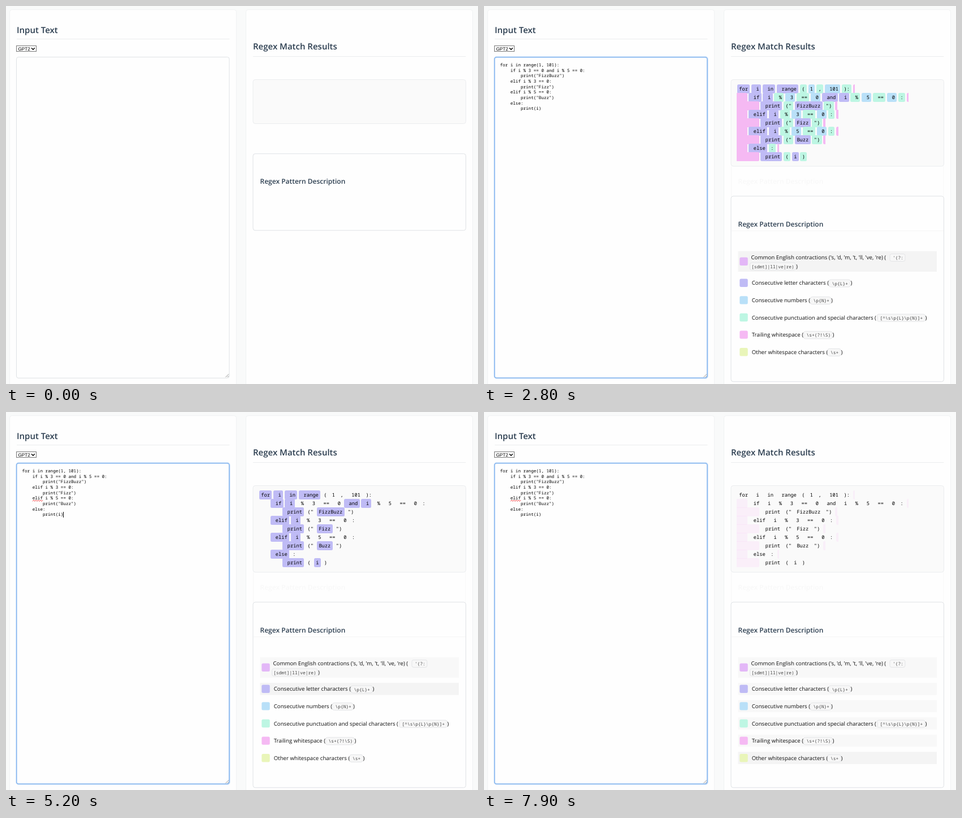
An HTML page that plays this animation: 835 px wide and 670 px high, repeating every 8 s.

```html
<!DOCTYPE html>
<html lang="en">
<head>
<meta charset="utf-8">
<title>Regex match results</title>
<style>
html, body { margin: 0; width: 100%; height: 100%; overflow: hidden; background: #f9fafa; }
body { position: relative; text-rendering: geometricPrecision; }
svg { position: absolute; left: 0; top: 0; }
text { white-space: pre; font: 9.7px "Open Sans", "Noto Sans", sans-serif; fill: #111; }
.h1, .h2 { font-weight: 600; fill: #2c3e50; }
.h1 { font-size: 15px; }
.h2 { font-size: 12px; }
.code, #tokens { font-family: "Noto Sans Mono", "DejaVu Sans Mono", monospace; }
.code { font-size: 7.6px; fill: #000; }
.chipText { font-size: 7.9px; fill: #444; }
.chip { fill: #f7f7f7; stroke: #e4e5e7; }
.card { fill: #fefefe; stroke: #f0f2f3; }
.rule { stroke: #ebedee; }
.box { fill: #fefefe; stroke: #dfe2e5; }
.result { fill: #fafafa; stroke: #ebedef; }
.ghost { fill: #f8f8f8; }
#tokens { position: absolute; left: 446.5px; top: 140px; margin: 0; white-space: pre;
  font-size: 8.75px; line-height: 15px; color: #000; }
#tokens span { padding: 1.55px 3.3px; margin: 0 1.4px; border-radius: 2.5px; }
</style>
</head>
<body>
<svg width="835" height="670" fill="none">
  <rect class="card" x="6.5" y="6.5" width="401" height="690" rx="4"/>
  <rect class="card" x="424.5" y="6.5" width="401" height="690" rx="4"/>
  <text class="h1" x="19" y="48">Input Text</text>
  <path class="rule" d="M19 58.5H395.500M437 89.500H813.500"/>
  <rect x="18.500" y="70.500" width="35" height="10" stroke="#777" fill="#fff"/>
  <text x="21.500" y="78.700" style="font:8.2px 'Liberation Sans',Arial,sans-serif;fill:#000">GPT2</text>
  <path d="M45 74.200L47.900 77.200L50.800 74.200" stroke="#000" stroke-width="1.500"/>
  <rect class="box" x="18.500" y="90.500" width="376.500" height="569" rx="3.500"/>
  <g id="focus">
    <rect x="18" y="90" width="378" height="570" rx="4" stroke="#dfecfb" stroke-width="2"/>
    <rect x="18.700" y="90.700" width="376.200" height="568.600" rx="3.500" stroke="#7fb2ee" stroke-width="1.500"/>
  </g>
  <path d="M388.500 658L394 652.500M391.800 658L394 655.800" stroke="#777" stroke-width=".8"/>
  <text class="h1" x="437" y="77">Regex Match Results</text>

  <g id="before">
    <rect class="result" x="437" y="130.500" width="376.500" height="78" rx="4"/>
    <rect class="box" x="437" y="261.800" width="376.500" height="136" rx="4"/>
    <text class="h2" x="449.500" y="315">Regex Pattern Description</text>
  </g>

  <g id="after">
    <path d="M437.500 284V337M813 284V337" stroke="#f7f7f7"/>
    <text class="h2 ghost" x="449.500" y="315">Regex Pattern Description</text>
    <rect class="result" x="437" y="130.500" width="376.500" height="153.500" rx="4"/>
    <rect class="box" x="437" y="337" width="376.500" height="328.800" rx="4"/>
    <path d="M438 398.500H813" stroke="#f6f6f6"/>
    <text class="h2" x="449.500" y="391">Regex Pattern Description</text>
    <g id="legend"></g>
    <g id="typed"></g>
    <path id="squiggle" stroke="#f03030" stroke-width=".9"/>
  </g>
  <path id="caret" stroke="#000"/>
</svg>
<pre id="tokens"></pre>

<script>
const $ = id => document.getElementById(id);
const esc = s => s.replace(/&/g, '&amp;').replace(/</g, '&lt;');
const show = (id, on) => { $(id).style.visibility = on ? 'visible' : 'hidden'; };
// last entry whose start time has passed
const at = (keys, t) => keys.filter(k => k[0] <= t).pop();

const program = `for i in range(1, 101):
    if i % 3 == 0 and i % 5 == 0:
        print("FizzBuzz")
    elif i % 3 == 0:
        print("Fizz")
    elif i % 5 == 0:
        print("Buzz")
    else:
        print(i)`;

const text = (x, y, s, cls = '') => `<text class="${cls}" x="${x}" y="${y}">${esc(s)}</text>`;
const chip = (x, y, w, s, tx) =>
  `<rect class="chip" x="${x}" y="${y - 9.5}" width="${w}" height="13" rx="3"/>` +
  text(tx, y, s, 'code chipText');

$('typed').innerHTML = program.split('\n')
  .map((line, i) => text(28.5, 107 + i * 9.68, line, 'code')).join('');
$('squiggle').setAttribute('d', 'M47 158.3' + 'l2 -2.200l2 2.200'.repeat(4) + 'l2 -2.200');

// Legend: label, pattern, swatch, chip x, chip width, hover start
const rows = [
  ["Common English contractions ('s, 'd, 'm, 't, 'll, 've, 're) (", '', '#e3b7f7', 0, 0, 2400],
  ['Consecutive letter characters (', '\\p{L}+', '#bfbbf5', 610.5, 37.5, 4500],
  ['Consecutive numbers (', '\\p{N}+', '#b9e0f8', 577.5, 36, 5400],
  ['Consecutive punctuation and special characters (', '[^\\s\\p{L}\\p{N}]+', '#bdf6e3', 695.5, 84.5, 6100],
  ['Trailing whitespace (', '\\s+(?!\\S)', '#f5b9f3', 565.5, 50.5, 6700],
  ['Other whitespace characters (', '\\s+', '#e9f5b9', 608, 23, 7800]
];
$('legend').innerHTML = rows.map(([label, code, color, cx, cw], i) => {
  const y = i ? 460.2 + i * 30.6 : 452.8;
  const h = i ? 21.5 : 36.5;
  const words = i
    ? text(473.7, y + 3.5, label) + chip(cx, y + 3.7, cw, code, cx + 5) + text(cx + cw + .6, y + 3.5, ')')
    : text(472.5, 448.5, label) + chip(718, 449, 27, "'(?:", 723) +
      chip(470.5, 464.5, 80.5, '[sdmt]|ll|ve|re)', 473) + text(552, 464.5, ')');
  return `<rect class="row" x="449.500" y="${y - h / 2}" width="351.500" height="${h}"/>` +
    `<rect x="452.300" y="${y - 7.2}" width="14.400" height="14.400" rx="2.500" fill="${color}"/>` + words;
}).join('');
const rowBoxes = [...document.querySelectorAll('.row')];

// Split the program into tokens, kinds in legend order from letters to whitespace
const splitter = / ?\p{L}+| ?\p{N}+| ?[^\s\p{L}\p{N}]+|\s+(?!\S)|\s+/gu;
const kindOf = s => /\p{L}/u.test(s) ? 0 : /\p{N}/u.test(s) ? 1 : /\S/.test(s) ? 2 : 3;
const tokens = program.match(splitter).map(s => {
  const el = document.createElement('span');
  el.textContent = s;
  $('tokens').append(el);
  return { el, kind: kindOf(s) };
});

// Highlight strength: time, letters, numbers, punctuation, whitespace
const levels = [
  [0, 1, 1, 1, 1], [3800, .5, .5, .5, .5], [3900, 0, 0, 0, 0],
  [4300, .5, .5, .5, .5], [4400, .9, .9, .9, .9], [4500, 1, 0, 0, 0],
  [5400, .5, .5, 0, 0], [5500, 0, 1, 0, 0],
  [6100, 0, .5, .5, 0], [6200, 0, 0, 1, 0],
  [6700, 0, 0, .8, .3], [6800, 0, 0, .6, .7], [6900, 0, 0, .35, .93],
  [7000, 0, 0, .1, 1], [7100, 0, 0, 0, 1],
  [7800, 0, 0, 0, .5], [7900, 0, 0, 0, .17]
];
const focus = [[0, 0], [900, .4], [1000, .8], [1100, 1]];
const blinks = [900, 1400, 1900, 2300, 2400, 2800, 3300, 3800, 4300, 4700, 5200, 5700, 6100, 6700, 7100, 7600];

function draw(t) {
  const pasted = t >= 2400;
  show('before', !pasted);
  show('after', pasted);
  show('tokens', pasted);
  show('squiggle', t >= 3300);
  $('focus').style.opacity = at(focus, t)[1];

  show('caret', blinks.filter(b => b <= t).length % 2);
  $('caret').setAttribute('d', pasted ? 'M101.500 177V187' : 'M28.500 99V109');

  rowBoxes.forEach((box, i) => {
    const end = i ? rows[i + 1]?.[5] ?? 8000 : 4300;
    box.style.fill = t < rows[i][5] ? 'none' : t < end ? '#f4f4f4' : '#f8f8f8';
  });

  const level = at(levels, t);
  for (const { el, kind } of tokens) {
    const alpha = Math.round(level[kind + 1] * 255).toString(16).padStart(2, '0');
    el.style.backgroundColor = rows[kind + 1][2] + alpha;
  }
}

const start = performance.now();
function tick() {
  draw((performance.now() - start) % 8000);
  requestAnimationFrame(tick);
}
tick();
</script>
</body>
</html>
```
